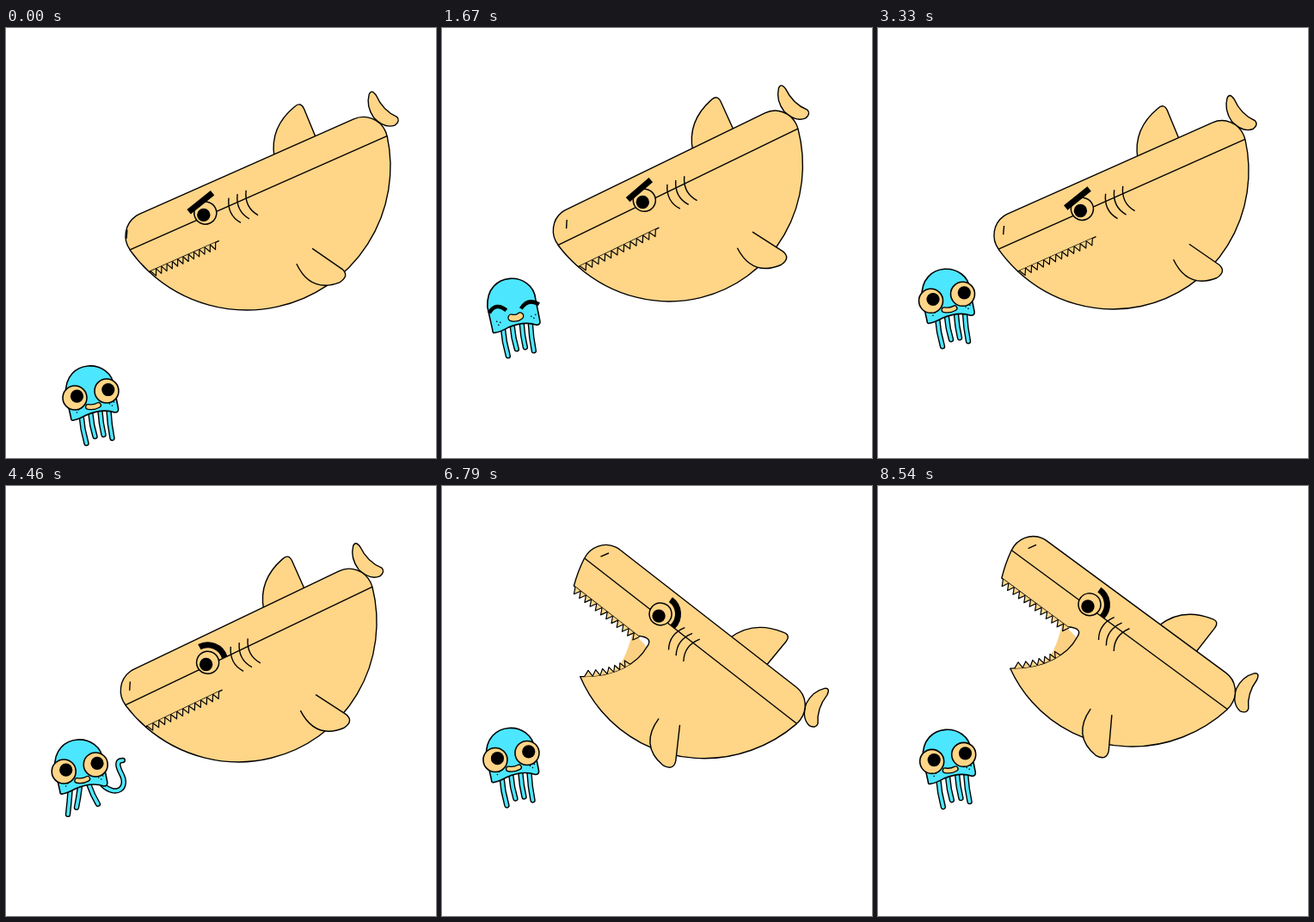
An HTML page with a canvas that plays this animation: 500 px wide and 500 px high, repeating every 8.58 s.

```html
<!DOCTYPE html>
<html>
<head>
<meta charset="utf-8">
<title>Shark and jellyfish</title>
<style>
html, body { margin: 0; width: 100%; height: 100%; overflow: hidden; background: #fff; }
canvas { display: block; }
</style>
</head>
<body>
<canvas id="stage" width="500" height="500"></canvas>
<script>
const c = document.getElementById('stage').getContext('2d');
const LOOP = 8580, BOB = 1667, TAU = Math.PI * 2;
const SKIN = '#ffd587', MOUTH = '#fbd083', BLUE = '#4ce6ff', INK = '#000';

// time, centre x, centre y, tilt in degrees, body length, eye x
const swim = [
  [0, 280, 161, -23.9, 1, -66],
  [900, 262, 160, -25, .955, -50],
  [1670, 260, 155, -25.9, .948, -42],
  [2650, 284, 149, -25, .975, -55],
  [3330, 270, 163, -24, .96, -49],
  [3900, 264, 163, -25, .96, -48],
  [4460, 268, 156, -25.6, .973, -51.4],
  [5270, 280, 139, -25.5, .97, -54],
  [5830, 273.4, 153, -14.1, .94, -49.5],
  [6300, 284, 153, 20, .945, -48],
  [6790, 309.4, 154, 37.9, .957, -46.8],
  [7750, 327, 151, 38, .96, -48],
  [8580, 299, 140, 36.3, .953, -45.3]
];

const mix = (a, b, k) => a + (b - a) * k;
const clamp = k => Math.min(1, Math.max(0, k));
const smooth = (t, a, b) => { const k = clamp((t - a) / (b - a)); return k * k * (3 - 2 * k); };
const cubicInOut = k => k < .5 ? 4 * k ** 3 : 1 - 4 * (1 - k) ** 3;

// Hermite curve through the keys
function pose(t) {
  let i = 0;
  while (i < swim.length - 2 && t > swim[i + 1][0]) i++;
  const at = n => swim[Math.min(swim.length - 1, Math.max(0, n))];
  const a = at(i), b = at(i + 1), p = at(i - 1), q = at(i + 2);
  const d = b[0] - a[0], u = (t - a[0]) / d, v = 1 - u;
  return a.slice(1).map((y, n) => {
    const z = b[n + 1];
    const m = (z - p[n + 1]) / (b[0] - p[0]) * d, w = (q[n + 1] - y) / (q[0] - a[0]) * d;
    return v * v * (1 + 2 * u) * y + u * v * v * m + u * u * (3 - 2 * u) * z - u * u * v * w;
  });
}

function paint(path, fill, width = 1.4) {
  if (fill) { c.fillStyle = fill; c.fill(path); }
  if (width) { c.strokeStyle = INK; c.lineWidth = width; c.stroke(path); }
}
const draw = (d, fill, width) => paint(new Path2D(d), fill, width);

function disc(x, y, r, fill, width = 0) {
  const p = new Path2D();
  p.arc(x, y, r, 0, TAU);
  paint(p, fill, width);
}

function tube(path, outer, inner, fill) {
  c.lineCap = 'round';
  paint(path, null, outer);
  c.strokeStyle = fill;
  c.lineWidth = inner;
  c.stroke(path);
  c.lineCap = 'butt';
}

function shark(t) {
  const [x, y, tilt, sx, ex] = pose(t);
  const angle = tilt * Math.PI / 180, open = smooth(t, 5300, 6120);
  const sy = .65 + .35 * sx, rx = 167 * sx, ry = 167 * sy;
  const corner = .203, jawY = 66, hinge = Math.asin(jawY / ry);
  const drop = hinge + 38 * open * Math.PI / 180;

  // lower lip, from the mouth corner to the jaw tip
  const back = [ex + 1 + 10 * open, jawY + 4 * open];
  const tip = [-rx * Math.cos(drop), ry * Math.sin(drop)];
  const lipA = [back[0] + 3 * open, back[1] + 20 * open];
  const lipB = [tip[0] + 60 - 26 * open, tip[1] - 25 * open];
  const lip = k => [0, 1].map(n => (1 - k) ** 3 * back[n] + 3 * k * (1 - k) ** 2 * lipA[n]
    + 3 * k * k * (1 - k) * lipB[n] + k ** 3 * tip[n]);

  c.save();
  c.translate(x, y);
  c.rotate(angle);

  c.save();
  c.translate(rx, 0);
  draw('M-3-19Q2-24 4-15Q4 5 16 18Q18 24 10 26Q-3 25-9 8Q-12-8-3-19Z', SKIN);
  c.restore();
  draw('M34 2Q43-31 79-41Q88-44 88-34L87 2Z', SKIN);

  if (open) {
    const inside = new Path2D(), end = lip(.62);
    inside.moveTo(ex - 13, jawY);
    inside.quadraticCurveTo(ex, mix(jawY, end[1], .55), ...end);
    for (let k = .6; k > 0; k -= .05) inside.lineTo(...lip(k));
    inside.lineTo(...back);
    paint(inside, MOUTH, 0);
  }

  const body = new Path2D();
  body.ellipse(136 * sx, 28 * sy, 28 * sx, 28 * sy, 0, -Math.PI / 2, corner);
  body.ellipse(0, 0, rx, ry, 0, corner, Math.PI - drop);
  body.bezierCurveTo(...lipB, ...lipA, ...back);
  body.quadraticCurveTo(back[0], jawY - 10 * open, ex - 5, jawY);
  body.lineTo(-rx * Math.cos(hinge), jawY);
  body.ellipse(0, 0, rx, ry, 0, Math.PI - hinge, Math.PI - corner);
  body.ellipse(-136 * sx, 28 * sy, 28 * sx, 28 * sy, 0, Math.PI - corner, Math.PI * 1.5);
  body.closePath();
  paint(body, SKIN);

  const side = 163.4 * sx, midY = 33.6 * sy;
  draw(`M${-side} ${midY}H${side}`);

  const jawX = -rx * Math.cos(hinge) + 2, step = (ex - 3 - jawX) / 12;
  for (let i = 0; i < 12; i++) {
    const left = jawX + i * step;
    draw(`M${left} ${jawY}l${step / 2} 7.5l${step / 2} -7.5`, SKIN, 1.2);
  }
  if (open) {
    const size = 7 * clamp(open * 3);
    for (let i = 0; i < 7; i++) {
      const a = lip(.4 + i * .08), b = lip(.48 + i * .08);
      const dx = b[0] - a[0], dy = b[1] - a[1], len = Math.hypot(dx, dy);
      const peak = [(a[0] + b[0]) / 2 - dy / len * size, (a[1] + b[1]) / 2 + dx / len * size];
      draw(`M${a}L${peak}L${b}`, SKIN, 1.2);
    }
  }

  // features that slide along with the eye
  c.translate(ex, 0);
  draw('M97 118L119 154Q124 165 110 167Q74 165 73 127', SKIN);
  for (let i = 0; i < 3; i++) draw(`M${32 + i * 11} 55q-10 17 1 32`.replace(' 55', ' 25'));
  draw('M-91 11l-5 9');

  c.translate(0, 30);
  disc(0, 0, 13, SKIN, 1.5);
  c.save();
  c.rotate(-angle);
  disc(-2, 2.2, 7.7, INK);
  c.restore();

  const calm = [-17, -9, -5.7, -12, 5.7, -15, 17, -18];
  const raised = [-1, -20.5, 11.9, -21, 22, -9.9, 20.3, 3];
  const awe = smooth(t, 3950, 4250);
  const b = calm.map((n, i) => mix(n, raised[i], awe));
  draw(`M${b.slice(0, 2)}C${b.slice(2)}`, null, 7);
  c.restore();
}

function jelly(t) {
  const bob = (1 - Math.cos(TAU * (t - 3330) / BOB)) / 2;
  const below = 1 - cubicInOut(clamp((t - 500) / 1650));
  const happy = t > 1250 && t < 2500;
  const wave = smooth(t, 3700, 4100) - smooth(t, 4950, 5350);
  const splay = bob * bob;

  c.save();
  c.translate(80 + 8 * bob + 18.5 * below, 313.3 + 20.4 * bob + 112.7 * below);

  // root x, root y, hanging tip, splayed tip
  const arms = [
    [-11, 24, -5, 57, -22, 51],
    [0, 23, 5, 49, -12, 43],
    [11, 20, 15, 47, 27, 37],
    [21, 19, 25, 51, 41, 39]
  ];
  arms.forEach(([x, y, hx, hy, sx, sy], i) => {
    const tx = mix(hx, sx, splay), ty = mix(hy, sy, splay), path = new Path2D();
    if (i === 3 && wave > 0) {
      const sway = 4 * Math.sin((t - 4460) / 105);
      const up = [[27, 20], [42, 34], [58, 24], [48 + sway / 2, 6], [44 + sway, -2], [42 + sway, -9], [50 + sway, -9]];
      const p = up.map((q, k) => [mix(mix(x, tx, k / 6), q[0], wave), mix(mix(y, ty, k / 6), q[1], wave)]);
      path.moveTo(...p[0]);
      path.bezierCurveTo(...p[1], ...p[2], ...p[3]);
      path.bezierCurveTo(...p[4], ...p[5], ...p[6]);
    } else {
      path.moveTo(x, y);
      path.quadraticCurveTo(mix(x, tx, .2 + .3 * splay), (y + ty) / 2, tx, ty);
    }
    tube(path, 6.4, 3.6, BLUE);
  });

  draw('M-23 27L-29 0C-31-43 24-42 27-9L32 16Q33 21 28 21Q14 16-5 24Q-14 29-20 30Q-23 31-23 27Z', BLUE, 1.6);
  for (const [x, y] of [[-18, 17], [-14, 18], [-16, 21], [22, 11], [27, 9], [25, 13]]) disc(x, y, .8, INK);

  if (happy) {
    draw('M-27 7Q-19-6-7 4M10 2Q18-11 31-3', null, 4.5);
    tube(new Path2D('M-1 12.5Q5 14 9 10.5'), 9, 6.4, SKIN);
  } else {
    disc(-18.5, 4, 14, SKIN, 1.6);
    disc(18.5, -4, 14, SKIN, 1.6);
    disc(-16, 2.2, 7.6, INK);
    disc(20.3, -5.5, 7.6, INK);
    tube(new Path2D('M-3 14.5Q4 15.5 9 12.5'), 7, 4.4, SKIN);
  }
  c.restore();
}

function frame(now) {
  const t = now % LOOP;
  c.fillStyle = '#fff';
  c.fillRect(0, 0, 500, 500);
  c.lineJoin = 'round';
  shark(t);
  jelly(t);
  requestAnimationFrame(frame);
}
frame(0);
</script>
</body>
</html>
```
